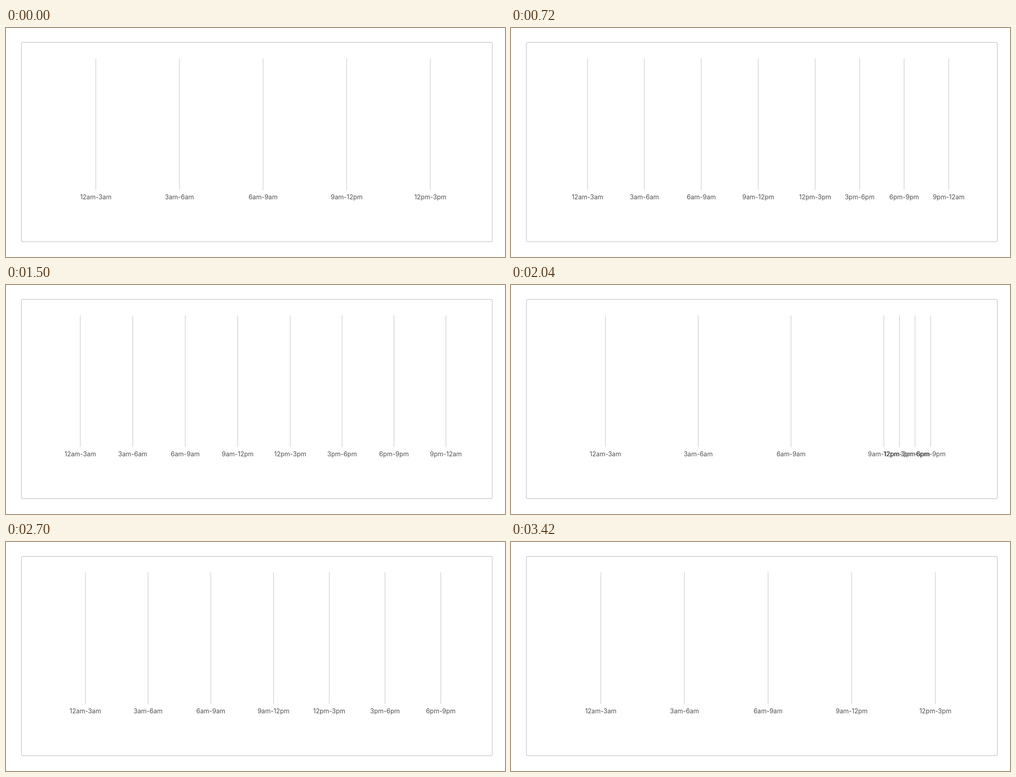
Recreate the animation shown at these times as an HTML page. Size 1102 px wide and 508 px high, loop 3600 ms.

```html
<!DOCTYPE html>
<html lang="en">
<head>
<meta charset="utf-8">
<title>Time axis</title>
<style>
  html, body { margin: 0; width: 100%; height: 100%; overflow: hidden; background: #fff; }
  svg { display: block; }
  rect { fill: #fff; stroke: #d7d7d7; stroke-width: 2; }
  line { stroke: #d3d3d3; stroke-width: 1.5; }
  text { font: 14px Inter, Roboto, sans-serif; fill: #50504e; text-anchor: middle; }
</style>
</head>
<body>
<svg width="1102" height="508" viewBox="0 0 1102 508">
  <rect x="34" y="32" width="1040" height="442" rx="3"/>
</svg>
<script>
const LOOP = 3600, STEP = 60, LEFT = 106, WIDTH = 923.4, ADDED = 3;
const labels = ['12am-3am', '3am-6am', '6am-9am', '9am-12pm',
                '12pm-3pm', '3pm-6pm', '6pm-9pm', '9pm-12am'];

// Each phase shows `count` ticks until `begin`, adds more, and is cut off at `end`.
const phases = [
  { count: 5, begin: 240, end: 1680, lead: 47 },
  { count: 4, begin: 2040, end: 3420, lead: 84 },
  { count: 5, begin: LOOP, end: LOOP, lead: 0 }
];

const svg = document.querySelector('svg');
function add(parent, name, attrs) {
  const el = document.createElementNS(svg.namespaceURI, name);
  for (const key in attrs) el.setAttribute(key, attrs[key]);
  return parent.appendChild(el);
}

const ticks = labels.map(label => {
  const g = add(svg, 'g', {});
  add(g, 'line', { y1: 67.5, y2: 359.5 });
  add(g, 'text', { y: 380 }).textContent = label;
  return g;
});

// Exponential ease-out that reaches 1 in finite time.
function ease(ms) {
  const rest = 0.002;
  return Math.min(1, (1 - Math.exp(-0.0036 * ms)) / (1 - rest));
}

function draw(now) {
  const t = Math.floor(now % LOOP / STEP) * STEP;
  const { count, begin, lead } = phases.find(p => t < p.end);
  const growing = t >= begin;
  const total = count + ADDED;
  const q = growing ? ease(t - begin + lead) : 0;
  const newGap = WIDTH / total * q;
  const oldGap = (WIDTH - ADDED * newGap) / count;

  ticks.forEach((tick, i) => {
    const extra = Math.max(0, i - count + 1);
    const x = LEFT + oldGap * (0.5 + i - extra) + newGap * extra;
    tick.setAttribute('transform', `translate(${x.toFixed(2)} 0)`);
    tick.style.display = i < (growing ? total : count) ? '' : 'none';
  });
}

const start = performance.now();
function loop() {
  draw(performance.now() - start);
  requestAnimationFrame(loop);
}
loop();
</script>
</body>
</html>
```
